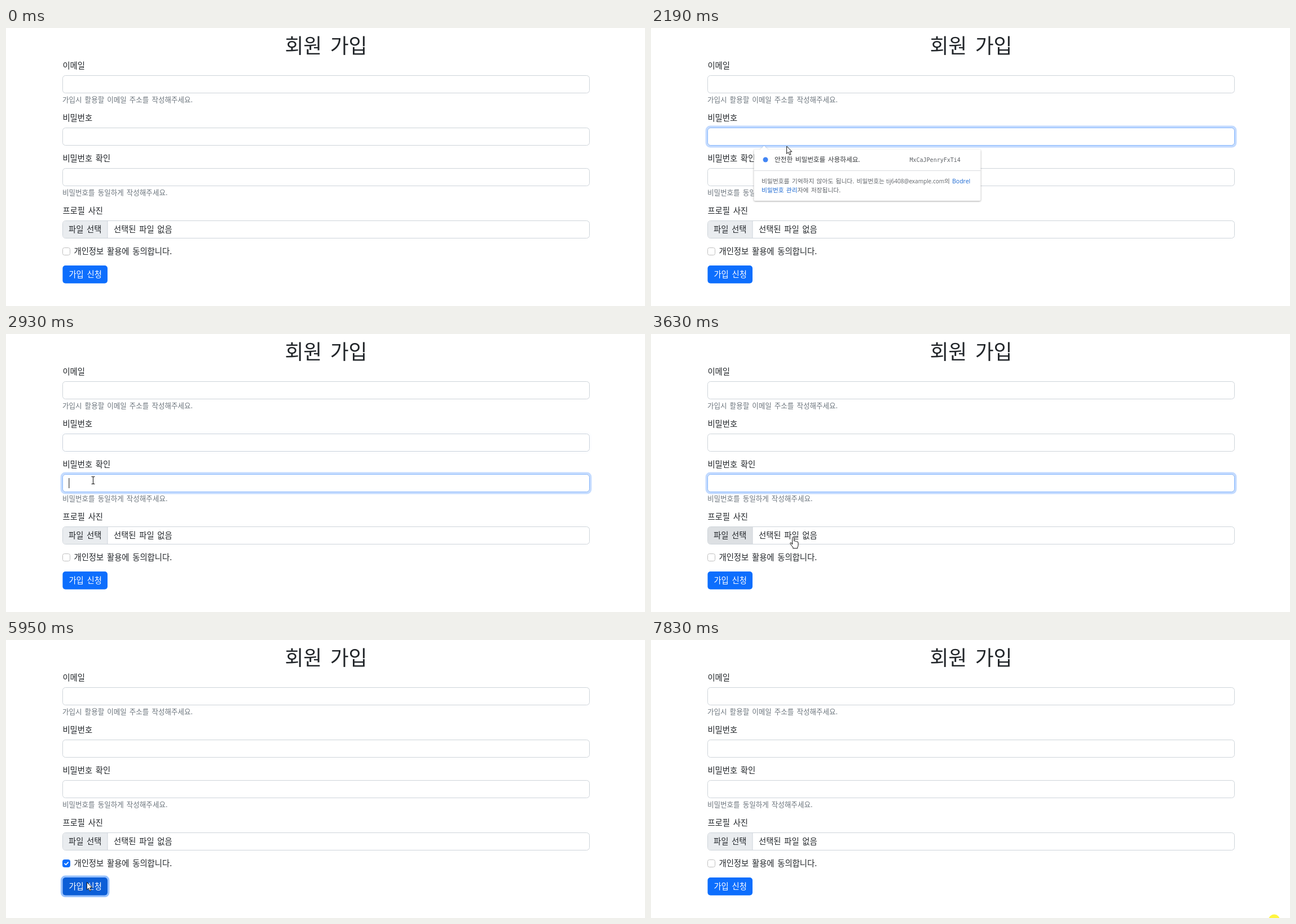
These frames come from a looping animation (1133 px wide and 494 px high, 7900 ms). An HTML page:

```html
<!DOCTYPE html>
<html lang="ko">
<head>
<meta charset="utf-8">
<title>회원 가입</title>
<style>
  html, body { margin: 0; width: 100%; height: 100%; overflow: hidden; background: #fff; }
  svg { display: block; width: 100vw; height: 100vh; }
  text { font-family: "Noto Sans CJK KR", "Noto Sans KR", "Noto Sans CJK JP", sans-serif; font-weight: 350; word-spacing: .12em; white-space: pre; }
  .latin { font-family: "Open Sans", "Noto Sans", sans-serif; font-weight: 400; }
  .mono { font-family: "DejaVu Sans Mono", monospace; font-weight: 400; }
  #popup .card { filter: drop-shadow(0 1px 1.5px rgba(0, 0, 0, .35)); }
</style>
</head>
<body>
<svg id="stage" viewBox="0 0 1133 494" xmlns="http://www.w3.org/2000/svg">
  <g id="form"></g>
  <g id="popup">
    <path class="card" fill="#fff" d="M184.500 216H193.500L200.500 209.500L207.500 216H582.500q2 0 2 2V305q0 2-2 2H184.500q-2 0-2-2V218q0-2 2-2Z"/>
    <rect id="row" x="182.500" y="217" width="402" height="36" fill="#f3f4f5"/>
    <path d="M182.500 253.500H584.500" stroke="#dadce0"/>
    <circle cx="203" cy="234" r="4.500" fill="#4285f4"/>
  </g>
  <g id="cursor" stroke-linejoin="round">
    <path id="arrow" fill="#fff" stroke="#111" d="M.4.400V13.800L3.400 11 5.500 15.900 7.800 14.900 5.700 10.200H9.700Z"/>
    <path id="beam" fill="none" stroke="#222" stroke-width="1.100" d="M-3 -6.500H-1L0 -5.700 1 -6.500H3M0 -6V6M-3 6.500H-1L0 5.700 1 6.500H3"/>
    <path id="hand" transform="translate(-6 -.600)" fill="#fff" stroke="#111" d="M4.500 13.500V2.200a1.600 1.600 0 0 1 3.200 0V7.500q1.500-1.300 2.600.600q1.600-1 2.500.700q2.200-.600 2.200 1.600v4.500q0 2-1.200 3.600V20.500H5.800V18.700Q3 15.500.9 12.300q-.600-1.800 1.200-1.900q1.200.200 2.400 3.100Z"/>
  </g>
  <circle id="press" r="10" fill="#fff200" opacity=".75"/>
</svg>
<script>
const LOOP = 7900, LEFT = 100, WIDTH = 935;
const INK = '#212529', MUTED = '#6c757d', LINE = '#ced4da', GREY = '#5f6368', LINK = '#1967d2';
const $ = id => document.getElementById(id);
const form = $('form'), popup = $('popup');

function add(parent, tag, attrs, content) {
  const el = document.createElementNS('http://www.w3.org/2000/svg', tag);
  for (const key in attrs) el.setAttribute(key, attrs[key]);
  if (content) el.textContent = content;
  parent.appendChild(el);
  return el;
}

// Text is placed by its left edge and the middle of its line.
function write(parent, x, mid, size, fill, content, extra) {
  return add(parent, 'text', { x, y: mid + size * .35 - .4, 'font-size': size * .896, fill, ...extra }, content);
}

function box(parent, x, y, width, height, rx, attrs) {
  return add(parent, 'rect', { x, y, width, height, rx, ...attrs });
}

function field(y) {
  const base = [LEFT + .5, y + .5, WIDTH - 1, 31, 5];
  box(form, ...base, { fill: '#fff', stroke: LINE });
  const focus = add(form, 'g', { opacity: 0 });
  box(focus, LEFT - 1.7, y - 1.7, WIDTH + 3.4, 35.4, 6.7,
    { fill: 'none', stroke: '#0d6efd', 'stroke-opacity': .25, 'stroke-width': 3.4 });
  box(focus, ...base, { fill: 'none', stroke: '#86b7fe' });
  const caret = box(form, 111.3, y + 7, 1, 18, 0, { fill: '#111' });
  return { focus, caret };
}

write(form, 567.5, 30.9, 40, INK, '회원 가입', { 'text-anchor': 'middle' });
for (const [y, label] of [[67, '이메일'], [160, '비밀번호'], [232, '비밀번호 확인'], [324.5, '프로필 사진']])
  write(form, LEFT + .4, y, 16, INK, label);
write(form, LEFT, 127.5, 14, MUTED, '가입시 활용할 이메일 주소를 작성해주세요.');
write(form, LEFT, 292.5, 14, MUTED, '비밀번호를 동일하게 작성해주세요.');

field(84).caret.remove();
const password = field(177), confirmField = field(249);
field(342).caret.remove();
const fileButton = add(form, 'path', { d: 'M180 343V373H105q-4 0-4-4V347q0-4 4-4Z' });
add(form, 'path', { d: 'M180 343V373', stroke: LINE });
write(form, 111, 357.5, 16, INK, '파일 선택');
write(form, 191, 357.5, 16, INK, '선택된 파일 없음');

const checkRing = box(form, 98.5, 388.5, 17, 17, 5,
  { fill: 'none', stroke: '#0d6efd', 'stroke-opacity': .25, 'stroke-width': 3.4 });
const check = box(form, 100.5, 390.5, 13, 13, 3);
const tick = add(form, 'path', { d: 'M104 397.300L106.200 399.400L110.200 395.200', fill: 'none',
  stroke: '#fff', 'stroke-width': 1.7, 'stroke-linecap': 'round', 'stroke-linejoin': 'round' });
write(form, 120.5, 397, 16, INK, '개인정보 활용에 동의합니다.');

const buttonRing = box(form, 98.6, 420.3, 83.1, 35.1, 6.7,
  { fill: 'none', stroke: '#3184fd', 'stroke-opacity': .5, 'stroke-width': 3.4 });
const button = box(form, LEFT + .4, 422, 79.6, 31.7, 5);
write(form, 111.4, 438.2, 16, '#fff', '가입 신청');

write(popup, 219, 234.2, 13, '#303336', '안전한 비밀번호를 사용하세요.');
add(popup, 'text', { x: 458.5, y: 238, 'font-size': 10, class: 'mono', fill: GREY }, 'MxCaJPenryFxTi4');
write(popup, 196, 271.7, 12, GREY, '비밀번호를 기억하지 않아도 됩니다. 비밀번호는');
const account = write(popup, 417, 271.7, 12, GREY);
add(account, 'tspan', { class: 'latin', 'font-size': 10 }, 'tij6408@example.com');
add(account, 'tspan', {}, '의');
add(popup, 'text', { x: 534, y: 275.6, 'font-size': 10.5, class: 'latin', fill: LINK }, 'Bodrel');
const manager = write(popup, 196, 288.2, 12, GREY);
add(manager, 'tspan', { fill: LINK }, '비밀번호 관리');
add(manager, 'tspan', {}, '자에 저장됩니다.');

const linear = u => u;
const out = u => 1 - (1 - u) ** 2;
const smooth = u => u * u * (3 - 2 * u);

// Pointer stops: time, x, y, easing towards this stop.
const path = [
  [0, 1200, 600], [479, 1200, 600], [480, 982, 472], [1250, 254, 216, out], [1590, 265, 195],
  [1980, 265, 195], [2660, 154.5, 260, smooth], [3140, 154.5, 260], [3630, 252, 361, smooth],
  [3980, 267, 368, out], [4110, 267, 369], [4310, 267, 369], [4650, 193, 396, out],
  [5190, 193, 396], [5600, 143, 430, out], [6800, 143, 430], [7560, 1097, 487, smooth],
  [7630, 1105, 497.5], [LOOP, 1105, 497.5]
];
const STEP = 69.5;   // the pointer is sampled in steps

function pointer(t) {
  const i = path.findIndex(p => p[0] > t);
  const [t0, x0, y0] = path[i - 1], [t1, x1, y1, ease = linear] = path[i];
  const u = ease(Math.floor((t - t0) / STEP) * STEP / (t1 - t0));
  return [x0 + (x1 - x0) * u, y0 + (y1 - y0) * u];
}

const between = (v, a, b) => v >= a && v < b;
const inside = (x, y, l, t, r, b) => between(x, l, r) && between(y, t, b);
const ramp = (t, start) => smooth(Math.min(1, Math.max(0, (t - start) / 150)));
const fade = (t, on, off) => ramp(t, on) - ramp(t, off);
const blink = (t, on, off) => between(t, on, off) && (t - on) % 1060 < 530;
const show = (el, on) => el.setAttribute('visibility', on ? 'visible' : 'hidden');
const mix = (a, b, u) => `rgb(${a.map((v, i) => Math.round(v + (b[i] - v) * u))})`;

const presses = [[1660, 1790], [2800, 2930], [4850, 4925], [5800, 5930], [7830, LOOP]];
const BLUE = [13, 110, 253], HOVER = [11, 94, 215];

function draw(t) {
  const [x, y] = pointer(t);
  const open = between(t, 1790, 2930);
  const onPopup = open && inside(x, y, 182, 216, 585, 307);
  const onFile = inside(x, y, 100, 342, 1035, 374);
  const onText = [84, 177, 249].some(top => inside(x, y, 100, top, 1035, top + 32)) ||
    inside(x, y, 100, 286, 287, 300);

  password.focus.setAttribute('opacity', fade(t, 1650, 2800));
  confirmField.focus.setAttribute('opacity', fade(t, 2800, 4790));
  show(password.caret, blink(t, 1660, 2800));
  show(confirmField.caret, blink(t, 2800, 4850));
  popup.style.display = open ? '' : 'none';
  $('row').style.display = onPopup && y < 253 ? '' : 'none';
  fileButton.setAttribute('fill', onFile ? '#dde0e3' : '#e9ecef');

  const checked = between(t, 4925, 6080);
  check.setAttribute('fill', checked ? '#0d6efd' : '#fff');
  check.setAttribute('stroke', checked ? '#0d6efd' : '#bfbfbf');
  show(tick, checked);
  show(checkRing, between(t, 4925, 5800));

  const hover = t < 6080 ? ramp(t, 5400) : fade(t, 6080, 6880);
  button.setAttribute('fill', between(t, 5800, 5930) ? '#0a58ca' : mix(BLUE, HOVER, hover));
  buttonRing.setAttribute('opacity', t < 6080 ? ramp(t, 5790) : 0);

  show($('press'), presses.some(([a, b]) => between(t, a, b)));
  $('press').setAttribute('cx', x);
  $('press').setAttribute('cy', y);
  $('cursor').setAttribute('transform', `translate(${x.toFixed(1)} ${y.toFixed(1)})`);
  const kind = onPopup ? 'arrow' : onFile ? 'hand' : onText ? 'beam' : 'arrow';
  for (const id of ['arrow', 'beam', 'hand']) show($(id), id === kind);
}

const start = performance.now();
function play() {
  draw((performance.now() - start) % LOOP);
  requestAnimationFrame(play);
}
play();
</script>
</body>
</html>
```
